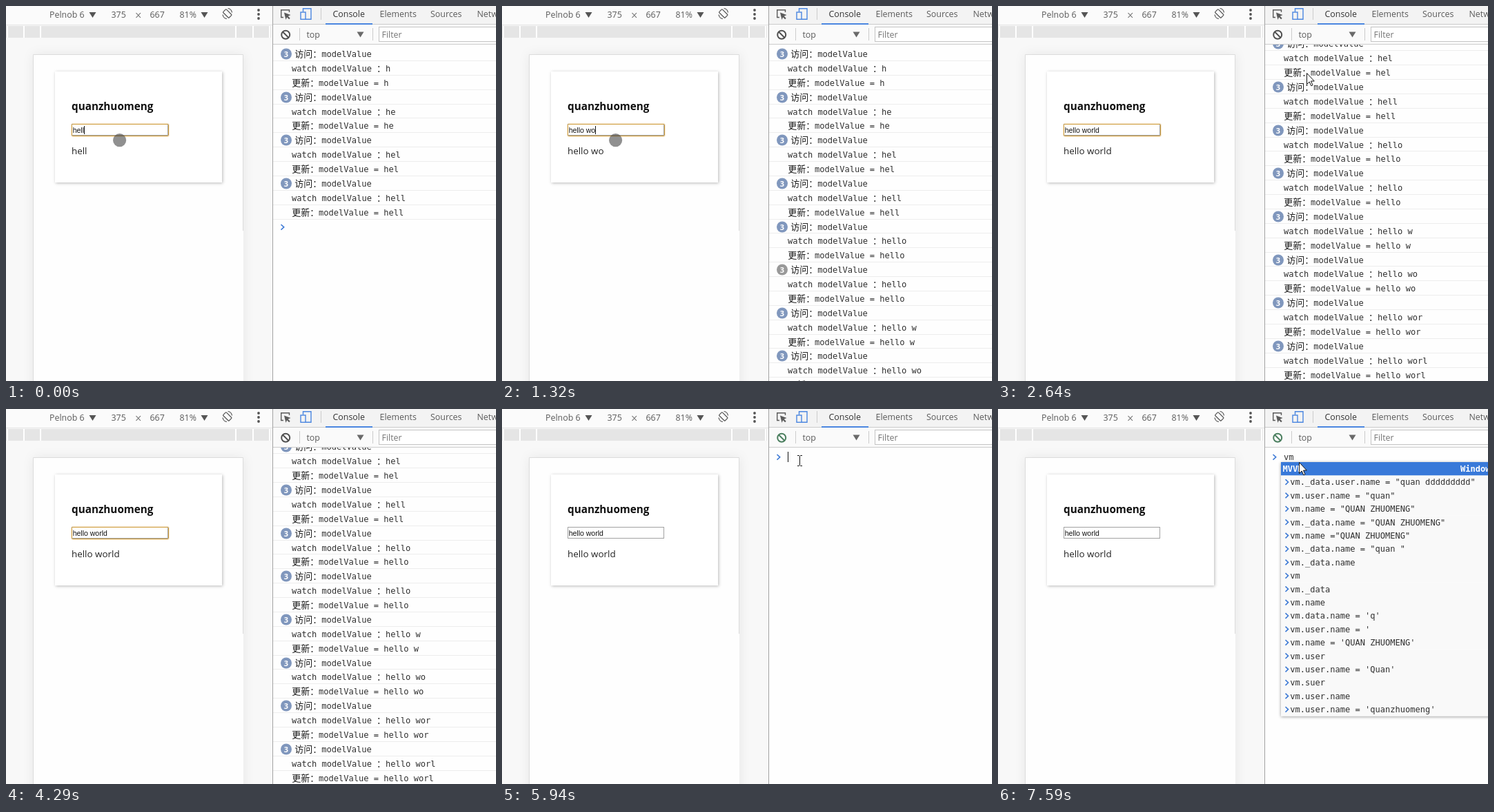
These frames come from a looping animation (710 px wide and 544 px high, 8 s). An HTML page:

```html
<!DOCTYPE html>
<html lang="zh-CN">
<head>
<meta charset="utf-8">
<title>Two-way binding demo</title>
<style>
  html, body { margin: 0; width: 100%; height: 100%; overflow: hidden; background: #fff; }
  svg { display: block; width: 710px; height: 544px; }
  text { white-space: pre; font: 12.4px "Open Sans", "Noto Sans", sans-serif; fill: #5a5a5a; }
  .mono { font: 12.05px "DejaVu Sans Mono", monospace; fill: #303030; }
  .cjk { font: 13px "Noto Sans CJK SC", "Noto Sans CJK", sans-serif; fill: #1a1a1a; }
  .b { font-weight: bold; }
  .field { font: 10.5px "Liberation Sans", Arial, sans-serif; fill: #111; }
  .num { font: bold 11px "Open Sans", sans-serif; fill: #fff; text-anchor: middle; }
  .chev { fill: none; stroke: #3f7bd6; stroke-width: 1.6; }
  .phone { filter: drop-shadow(0 0 8px rgba(0,0,0,.08)); }
  .card { filter: drop-shadow(1px 1px 2px rgba(0,0,0,.28)); }
  .pop { filter: drop-shadow(0 1px 2px rgba(0,0,0,.4)); }
  .sep { stroke: #ccc; }
</style>
</head>
<body>
<svg viewBox="0 0 710 544">
  <defs>
    <clipPath id="logClip"><rect x="387" y="56" width="323" height="488"/></clipPath>
    <clipPath id="leftClip"><rect y="47" width="386" height="497"/></clipPath>
  </defs>

  <!-- device side -->
  <rect width="386" height="544" fill="#f8f8f8"/>
  <rect width="386" height="27" fill="#fbfbfb"/>
  <path d="M0 27.5H386" stroke="#e4e4e4"/>
  <rect y="29" width="384" height="17" fill="#e5e5e5"/>
  <path d="M2 29V46M26 29V46M50 29V46M333 29V46M358 29V46M382 29V46" stroke="#fff" stroke-width="2"/>
  <text x="63" y="17">Pelnob 6</text>
  <text x="152.5" y="17">375</text>
  <text x="208.5" y="17">667</text>
  <text x="251.5" y="17">81%</text>
  <path d="M188.500 10l6.500 7m0-7l-6.500 7" stroke="#666" stroke-width="1.100"/>
  <path d="M120.500 9h10l-5 8zM282.500 9h10l-5 8z" fill="#555"/>
  <g fill="none" stroke="#555" stroke-width="1.200">
    <rect x="317.500" y="5" width="6.500" height="12" rx="1" transform="rotate(-45 320.700 11)"/>
    <path d="M321.500 3.500q5 .5 6 6M320 18.500q-5-.5-6-6"/>
  </g>
  <g fill="#555"><circle cx="366" cy="6" r="1.900"/><circle cx="366" cy="12" r="1.900"/><circle cx="366" cy="18" r="1.900"/></g>
  <g clip-path="url(#leftClip)">
    <rect class="phone" x="40" y="71" width="304" height="490" fill="#fefefe"/>
    <path d="M39.500 544V70.500H343.500V326" fill="none" stroke="#dcdcdc"/>
  </g>
  <rect class="card" x="71" y="95" width="242" height="161" fill="#fff"/>
  <text class="b" x="95" y="151" style="font-size:15.25px;fill:#111">quanzhuomeng</text>
  <rect x="95.500" y="171.500" width="139" height="16" fill="#fff" stroke="#a2a2a2"/>
  <g id="ring" fill="none" stroke="#cf9d3c">
    <rect x="94.500" y="170.500" width="142" height="19" rx="2" opacity=".2"/>
    <rect x="95.500" y="171.500" width="140" height="17" rx="1"/>
  </g>
  <text id="field" class="field" x="96.7" y="184"></text>
  <rect id="caret" y="174" width="1" height="12" fill="#111"/>
  <text id="echo" x="95" y="215" style="font-size:13.4px;fill:#222"></text>
  <circle id="touch" cx="164.600" cy="194.700" r="9.600" fill="#464646" fill-opacity=".6"/>

  <!-- console side -->
  <rect x="387" width="323" height="544" fill="#fefefe"/>
  <g id="log" clip-path="url(#logClip)"></g>
  <text id="typed" class="mono" x="414" y="74"></text>
  <rect id="promptCaret" y="62" width="1" height="15" fill="#111"/>
  <g id="listA"></g>
  <g id="listB"></g>

  <rect x="387" width="323" height="26" fill="#f3f3f3"/>
  <rect x="387" y="26" width="323" height="29" fill="#fafafa"/>
  <path class="sep" d="M387 26.500H710M387 55.500H710M456.500 3V20M425.500 32V50M531.500 32V50"/>
  <rect x="463" y="25" width="68" height="2" fill="#4a86e0"/>
  <g fill="none" stroke="#5a5a5a" stroke-width="1.400">
    <path d="M402 16.500H398.700V5.700H410.500V9"/>
    <path d="M403 9.500l9.500 3.500-3.800 1.700 3 3-1.600 1.600-3-3-1.600 3.600z" fill="#5a5a5a" stroke="none"/>
    <path d="M430.500 8.500V3.700H442V19.300H434" stroke="#4a86e0"/>
    <rect x="427" y="9" width="7" height="10.300" stroke="#4a86e0"/>
  </g>
  <text x="473.5" y="16" style="fill:#333">Console</text>
  <text x="541.5" y="16">Elements</text>
  <text x="615" y="16">Sources</text>
  <text x="682.5" y="16">Network</text>
  <g id="clear" fill="none" stroke-width="2"><circle cx="405.200" cy="41.700" r="6"/><path d="M401 37.500l8.500 8.500"/></g>
  <text x="435.5" y="46">top</text>
  <path d="M508.500 37.500h10l-5 8z" fill="#6a6a6a"/>
  <rect x="540.500" y="30.500" width="180" height="21" fill="#fff" stroke="#c4c4c4"/>
  <text x="544.5" y="46" style="fill:#757575">Filter</text>
  <path d="M386.500 0V544" stroke="#a3a3a3"/>

  <g id="tip">
    <rect x="1.500" y="21.500" width="128" height="18" fill="#fff" stroke="#8a8a8a"/>
    <text x="6" y="35" style="font-size:12px">Clear console – Ctrl+L</text>
  </g>
  <path id="arrow" d="M.5.5V16.500L4.200 13 6.800 18.800 9 17.800 6.500 12H11.300z" fill="#fff" stroke="#111"/>
  <path id="beam" d="M428 67.500h2.500l1 1 1-1h2.500M431.500 68.500v13M428 82.500h2.500l1-1 1 1h2.500" fill="none" stroke="#111"/>
</svg>
<script>
const $ = id => document.getElementById(id);
const LOOP = 8000, WORDS = "hello world";
const ROW = 20.88, GROUP = 3 * ROW, LOG_TOP = 59, LOG_BOTTOM = 629;
const POP_ROW = 19.4, POP_TOP = 77;

const mono = (x, y, s, extra = "") => `<text class="mono" x="${x}" y="${y}" ${extra}>${s}</text>`;
const cjk = (x, y, s) => `<text class="cjk" x="${x}" y="${y}">${s}</text>`;
const chevron = (x, y, w, h) => `<path class="chev" d="M${x} ${y - h}l${w} ${h}l${-w} ${h}"/>`;

// One log group: counted read, watcher line, update line.
function logGroup(n, top, badge) {
  const value = WORDS.slice(0, n);
  const y = i => Math.round(top + ROW * i);
  const base = i => y(i) + 15;
  const lines = [1, 2, 3].map(i => `M387 ${y(i) - 0.5}H710`).join("");
  return `<path d="${lines}" stroke="#ededed"/>
    <circle cx="406" cy="${y(0) + 10.5}" r="8" fill="${badge}"/>
    <text class="num" x="406" y="${y(0) + 14.5}">3</text>
    ${cjk(418.3, base(0), "访问：")}${mono(457.3, base(0), "modelValue")}
    ${mono(413.9, base(1), "watch modelValue")}${cjk(537, base(1), "：")}${mono(549.9, base(1), value)}
    ${cjk(414.2, base(2), "更新：")}${mono(453, base(2), "modelValue = " + value)}`;
}

// The whole log, scrolled so that the prompt stays in the panel.
let logKey;
function drawLog(count, greyGroup) {
  const key = count + "/" + greyGroup;
  if (key === logKey) return;
  logKey = key;
  const end = LOG_TOP + GROUP * count;
  const top = LOG_TOP - Math.max(0, end + ROW - LOG_BOTTOM);
  let out = chevron(398.5, Math.round(top + GROUP * count) + 10.8, 4.2, 3.8);
  for (let n = 1; n <= count; n++)
    out += logGroup(n, top + GROUP * (n - 1), n === greyGroup ? "#999" : "#8097bd");
  $("log").innerHTML = out;
}

// Suggestion list; rows are [text, note, noteX], strings starting with ">" are history.
function popup(id, rows, first, selected, height) {
  let out = `<clipPath id="${id}Clip"><rect x="410" y="${POP_TOP}" width="300" height="${height}"/></clipPath>
    <rect class="pop" x="410" y="${POP_TOP}" width="320" height="${height}" fill="#fff"/>
    <g clip-path="url(#${id}Clip)">`;
  rows.forEach(([s, note, noteX], i) => {
    const top = first + i * POP_ROW, base = Math.round(top + 14), on = i === selected;
    const old = s[0] === ">";
    const fill = on ? "#3879d9" : old ? "#f9f9f9" : "#fff";
    out += `<rect id="${id}${i}" x="410" y="${top}" width="300" height="${POP_ROW + 0.3}" fill="${fill}"/>`;
    if (old) out += chevron(416.5, top + 9.6, 4, 3.8) + mono(423.3, base, s.slice(1));
    else {
      const look = on ? 'style="fill:#fff;font-weight:bold"' : "";
      out += mono(412.5, base, s.replace("V", '<tspan class="b">V</tspan>'), look);
      if (note) out += mono(noteX, base, note, look || 'style="fill:#999"');
    }
  });
  $(id).innerHTML = out + "</g>";
}

const history = [
  '_data.user.name = "quan ddddddddd"', 'user.name = "quan"', 'name = "QUAN ZHUOMENG"',
  '_data.name = "QUAN ZHUOMENG"', 'name ="QUAN ZHUOMENG"', '_data.name = "quan "', "_data.name", "",
  "_data", "name", "data.name = 'q'", "user.name = '", "name = 'QUAN ZHUOMENG'", "user",
  "user.name = 'Quan'", "suer", "user.name", "user.name = 'quanzhuomeng'"
].map(s => [">vm" + (s && "." + s)]);

popup("listA", [
  ["SVGTransformList"], ["SVGTSpanElement"], ["SVGUnitTypes"], ["SVGUseElement"], ["SVGViewElement"],
  ["WebGLVertexArrayObject"], ["ontouchmove"], ["addEventListener", "EventTarget", 642.5],
  ["dispatchEvent"], ["removeEventListener"], ["valueOf", "Object", 678], ["values"],
  ["getEventListeners"], ["monitorEvents"], ["unmonitorEvents"], ["var", "keyword", 664], ["void"],
  ...history.slice(0, 4)
], 68.6, 10, 387.5);
popup("listB", [["MVVM", "Window", 670], ...history], POP_TOP, 0, 368.5);

// Value of the last step that has begun.
const step = (t, list) => list.reduce((v, [at, next]) => t >= at ? next : v, null);
const within = (t, ...spans) => spans.some(([a, b]) => t >= a && t < b);
const show = (id, on) => $(id).setAttribute("visibility", on ? "visible" : "hidden");
const move = (id, x, y) => $(id).setAttribute("transform", `translate(${x} ${y})`);

const typing = [[0, 4], [660, 5], [990, 6], [1320, 8], [1650, 10], [1980, 11]];
const pointer = [
  [2640, [447, 97]], [2970, [404, 37]], [3300, [494, 151]], [3630, [448, 73]], [3960, [417, 77]],
  [4290, null], [4950, [405, 43]], [5280, null], [6600, [436, 77]]
];

function draw(t) {
  const len = step(t, typing), text = WORDS.slice(0, len);
  $("field").textContent = $("echo").textContent = text;
  $("caret").setAttribute("x", Math.round(96.3 + $("field").getComputedTextLength()));
  show("caret", within(t, [0, 2310], [2970, 3300], [3960, 4290], [4950, 5280]));
  show("ring", t < 5280);
  show("touch", t < 2640);

  drawLog(t < 5610 ? len : 0, t < 1650 ? 6 : 0);

  $("typed").innerHTML = t < 6600 ? "" : t < 7260 ? 'v<tspan fill="#8a8a8a">alueOf</tspan>' : "vm";
  $("promptCaret").setAttribute("x", step(t, [[0, 414], [6600, 421], [7260, 428]]));
  show("promptCaret", within(t, [5940, 7590]));
  show("listA", within(t, [6600, 7260]));
  show("listB", t >= 7260);
  $("listA0").setAttribute("fill", t >= 6930 ? "#e9f0fa" : "#fff");

  $("clear").setAttribute("stroke", t < 4950 ? "#505050" : "#4b7f5f");
  const p = step(t, pointer);
  show("arrow", p);
  show("tip", within(t, [2970, 3300], [4950, 5280]));
  if (p) { move("arrow", ...p); move("tip", ...p); }
  show("beam", within(t, [5940, 6600]));
}

const start = performance.now();
function tick() {
  draw((performance.now() - start) % LOOP);
  requestAnimationFrame(tick);
}
tick();
</script>
</body>
</html>
```
